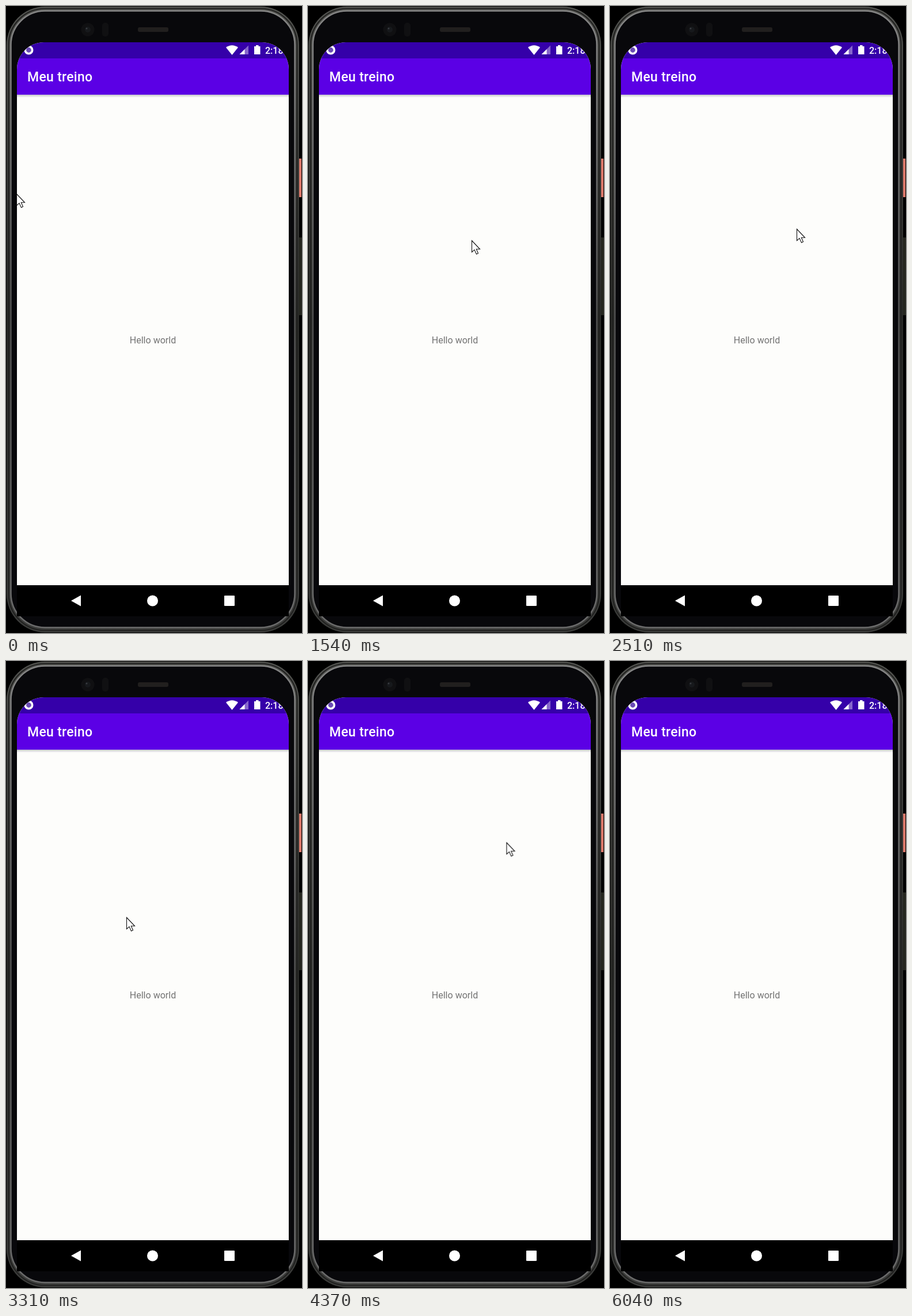
These frames come from a looping animation (514x1089 px, 6240 ms). An HTML page:

```html
<!DOCTYPE html>
<html lang="pt">
<head>
<meta charset="utf-8">
<title>Meu treino</title>
<style>
  html, body { margin: 0; width: 100%; height: 100%; overflow: hidden; background: #000; }
  svg { display: block; width: 100%; height: 100%; }
  text { font-family: Roboto, sans-serif; }
  .title { font-size: 23px; font-weight: 500; letter-spacing: .0125em; }
  .clock { font-size: 16px; font-weight: 500; }
  .hello { font-size: 16.07px; }

  #cursor { animation: wander 6240ms step-end infinite; }

  /* Each segment advances in pointer samples of about 30 ms. */
  @keyframes wander {
    0%     { transform: translate(18px, 326px); animation-timing-function: steps(12); }
    6.4%   { transform: translate(240px, 420px); }
    9.1%   { transform: translate(240px, 420px); animation-timing-function: steps(6); }
    12.33% { transform: translate(262px, 423px); }
    18.7%  { transform: translate(262px, 423px); animation-timing-function: steps(11); }
    24.67% { transform: translate(284px, 407px); animation-timing-function: steps(9); }
    29%    { transform: translate(488px, 199px); animation-timing-function: steps(2); }
    29.95% { transform: translate(516px, 163px); }
    32.2%  { transform: translate(516px, 290px); animation-timing-function: steps(6); }
    35.4%  { transform: translate(320px, 390px); }
    40.22% { transform: translate(324px, 387px); }
    41.82% { transform: translate(231px, 417px); }
    45%    { transform: translate(231px, 417px); animation-timing-function: steps(14); }
    53.04% { transform: translate(209px, 445px); animation-timing-function: steps(4); }
    55.12% { transform: translate(203px, 448px); animation-timing-function: steps(14); }
    62.65% { transform: translate(207px, 444px); animation-timing-function: steps(5); }
    65.2%  { transform: translate(250px, 423px); animation-timing-function: steps(6); }
    68.9%  { transform: translate(380px, 291px); animation-timing-function: steps(5); }
    71.62% { transform: translate(291px, 351px); }
    73.4%  { transform: translate(291px, 351px); animation-timing-function: steps(8); }
    77.55% { transform: translate(492px, 235px); }
    79.8%, 100% { transform: translate(530px, 235px); }
  }
</style>
</head>
<body>
<svg viewBox="0 0 514 1089">
  <defs>
    <clipPath id="screen">
      <path d="M19 1006V110a47 47 0 0 1 47-47H444a47 47 0 0 1 47 47V1006Z"/>
    </clipPath>
    <linearGradient id="shadow" x2="0" y2="1">
      <stop stop-color="#c4c4ca"/>
      <stop offset="1" stop-color="#fdfdfb"/>
    </linearGradient>
    <linearGradient id="metal" x2="0" y2="1">
      <stop stop-color="#52534f"/>
      <stop offset=".12" stop-color="#454643"/>
      <stop offset=".5" stop-color="#282926"/>
      <stop offset="1" stop-color="#3c3d3b"/>
    </linearGradient>
    <linearGradient id="shine" x2="0" y2="1">
      <stop stop-color="#858585"/>
      <stop offset=".12" stop-color="#7b7b7b"/>
      <stop offset=".5" stop-color="#505050"/>
      <stop offset="1" stop-color="#6c6c6c"/>
    </linearGradient>
  </defs>

  <!-- side buttons -->
  <rect x="508" y="265" width="5" height="67" fill="#df7a6c"/>
  <rect x="509" y="402" width="5" height="135" fill="#25261f"/>

  <!-- phone frame -->
  <rect x="1" y="1" width="508" height="1087" rx="67" fill="url(#metal)"/>
  <rect x="4.500" y="4.500" width="501" height="1080" rx="63" fill="none" stroke="#20201f" stroke-width="2"/>
  <rect x="8.500" y="8.500" width="493" height="1071" rx="59" fill="#08080b" stroke="url(#shine)" stroke-width="2.500"/>
  <path d="M19 1000H491V1060H19Z"/>

  <!-- camera, sensor and speaker -->
  <circle cx="142" cy="41" r="11.5" fill="#101012"/>
  <circle cx="142" cy="41" r="5" fill="#17191c"/>
  <circle cx="140" cy="39" r="1.5" fill="#383b40"/>
  <rect x="167" y="29" width="11" height="24" rx="5" fill="#101012"/>
  <rect x="229" y="37" width="53" height="8" rx="3" fill="#211f1e"/>

  <g clip-path="url(#screen)">
    <path fill="#fdfdfb" d="M19 63H491V1006H19Z"/>
    <path fill="#3500a9" d="M19 63H491V91H19Z"/>
    <path fill="#5b00e5" d="M19 91H491V154H19Z"/>
    <path fill="url(#shadow)" d="M19 154H491V159H19Z"/>

    <g fill="#fff">
      <circle cx="39.5" cy="76.5" r="6.2" fill="#6a4bb5" stroke="#fff" stroke-width="3.6"/>
      <path d="M382 72Q392.5 64.5 403 72L392.5 85Z"/>
      <path d="M405.5 84H421V68.5Z" opacity=".4"/>
      <path d="M405.5 84H414.5V75Z"/>
      <path d="M431 70H434V68H438.5V70H441.5V84H431Z"/>
      <text class="clock" x="450" y="83">2:18</text>
      <text class="title" x="37" y="131">Meu treino</text>
    </g>
    <text class="hello" x="255" y="586" text-anchor="middle" fill="#737373">Hello world</text>
  </g>

  <!-- navigation bar -->
  <g fill="#fff">
    <path d="M113 1033L130 1023.5V1042.5Z"/>
    <circle cx="254.5" cy="1033" r="9.5"/>
    <rect x="379" y="1024" width="18" height="18" rx="1"/>
  </g>

  <path id="cursor" d="M.5 .5V20.5L5 16.3L8.5 24L11.5 22.6L8.3 15.3H14.5Z"
        fill="#fff" stroke="#111" stroke-width="1.1"/>
</svg>
</body>
</html>
```
